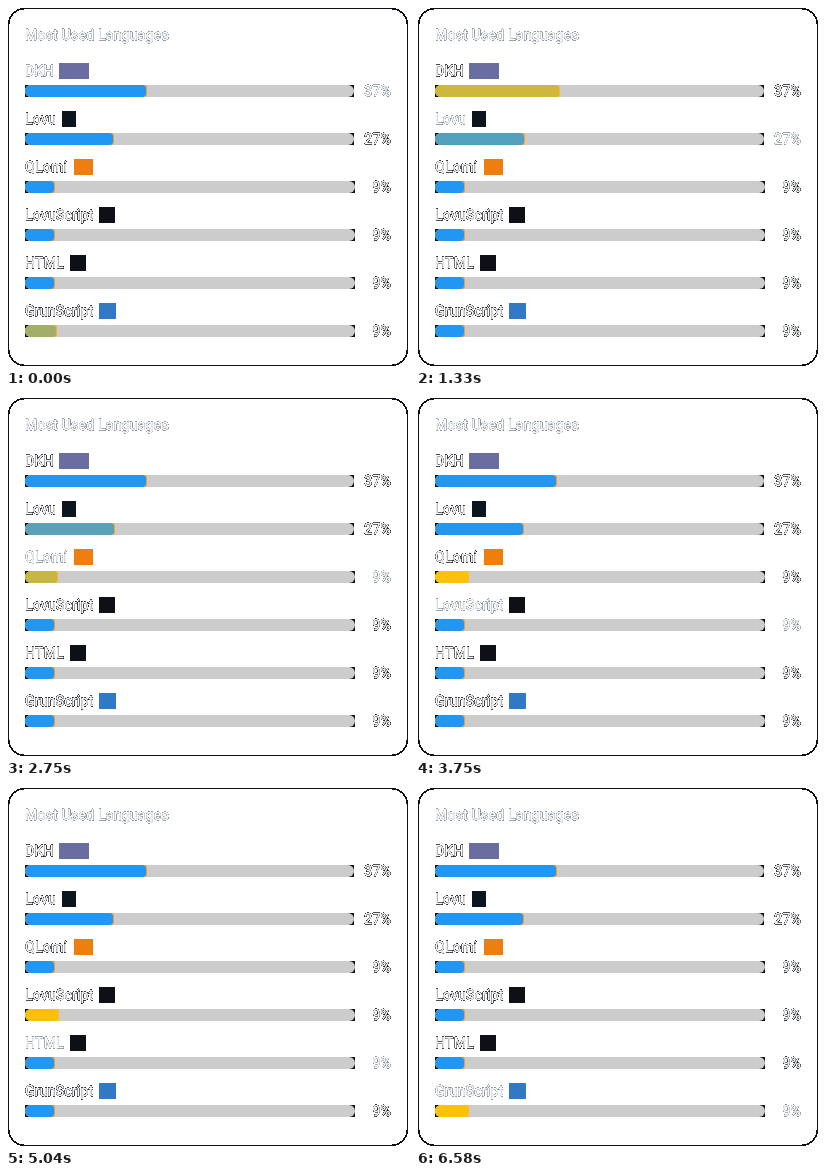
These frames come from a looping animation (404x362 px, 7500 ms). An HTML page with a canvas:

```html
<!DOCTYPE html>
<html lang="en">
<head>
<meta charset="utf-8">
<title>Most Used Languages</title>
<style>
  html, body { margin: 0; width: 100%; height: 100%; overflow: hidden; background: #fff; }
  canvas { display: block; width: 404px; height: 362px; }
</style>
</head>
<body>
<canvas id="stage" width="404" height="362"></canvas>
<script>
const W = 404, H = 362, LOOP = 7500, FADE = 380, FPS = 24;
const FONT = '14px Roboto, sans-serif', SPACING = '0.25px';
const LEFT = 19, RIGHT = 385, PITCH = 48, BAR_H = 12, GROW = 4;
const DARK = [13, 17, 23], SOFT = [120, 134, 148], WHITE = [255, 255, 255];
const BLUE = [33, 150, 243], AMBER = [255, 193, 7], ORANGE = [255, 152, 30];

const rows = [
  { name: 'DKH', share: 37, icon: [53, 30, '#6a6d9f'] },
  { name: 'Lovu', share: 27, icon: [56, 14, '#0b151d'] },
  { name: 'QLomi', share: 9, icon: [68, 19, '#ee7f0e'] },
  { name: 'LovuScript', share: 9, icon: [93, 16, '#0d1117'] },
  { name: 'HTML', share: 9, icon: [64, 16, '#0d1117'] },
  { name: 'GrunScript', share: 9, icon: [93, 17, '#3178c6'] }
];
const starts = [0, 1210, 2500, 3750, 5010, 6210];
const SEAM = 170; // how far the last row has already faded when the loop restarts

const ctx = document.getElementById('stage').getContext('2d');

const mix = (a, b, p) => a.map((v, i) => Math.round(v + (b[i] - v) * p));
const rgb = c => `rgb(${c.join(',')})`;

// Layer whose soft edge pixels are made opaque by blending ink into a matte.
function etch(matte, ink, draw) {
  const layer = document.createElement('canvas');
  layer.width = W;
  layer.height = H;
  const g = layer.getContext('2d', { willReadFrequently: true });
  g.font = FONT;
  g.letterSpacing = SPACING;
  g.fillStyle = g.strokeStyle = '#fff';
  draw(g);
  const img = g.getImageData(0, 0, W, H), d = img.data;
  for (let i = 0; i < d.length; i += 4) {
    const a = d[i + 3];
    d.set(a < 20 ? [0, 0, 0, 0] : [...mix(matte, ink, a / 255), 255], i);
  }
  g.putImageData(img, 0, 0);
  return layer;
}

// Slightly thickened glyphs.
function write(g, text, x, y) {
  g.lineWidth = 0.45;
  g.lineJoin = 'round';
  g.fillText(text, x, y);
  g.strokeText(text, x, y);
}

let frame, title;
function makeLayers() {
  frame = etch(DARK, DARK, g => {
    g.roundRect(2.5, 2.5, 399, 357, 16);
    g.stroke();
  });
  title = etch(SOFT, WHITE, g => write(g, 'Most Used Languages', LEFT, 34));
  rows.forEach((row, i) => {
    const draw = g => {
      const label = row.share + '%';
      write(g, row.name, LEFT, 70 + i * PITCH);
      write(g, label, RIGHT - g.measureText(label).width, 90 + i * PITCH);
    };
    row.plain = etch(DARK, WHITE, draw);
    row.lit = etch(SOFT, WHITE, draw);
  });
}

// cubic-bezier(.4, 0, .6, 1)
function ease(x) {
  if (x <= 0) return 0;
  if (x >= 1) return 1;
  let lo = 0, hi = 1, u;
  for (let n = 0; n < 20; n++) {
    u = (lo + hi) / 2;
    const bx = 1.2 * u * (1 - u) ** 2 + 1.8 * u * u * (1 - u) + u ** 3;
    if (bx < x) lo = u; else hi = u;
  }
  return u * u * (3 - 2 * u);
}

function glow(i, active, t) {
  const p = ease((t - starts[active]) / FADE);
  if (i === active) return p;
  if (active === 0) return i === rows.length - 1 ? 1 - ease((t + SEAM) / FADE) : 0;
  return i === active - 1 ? 1 - p : 0;
}

function fillRound(x, y, w, h, r, color) {
  ctx.beginPath();
  ctx.roundRect(x, y, w, h, r);
  ctx.fillStyle = color;
  ctx.fill();
}

function drawBar(row, y, p) {
  const width = row.share > 9 ? 329 : 330;
  const fill = Math.round(width * row.share / 100 + GROW * p);
  ctx.fillStyle = rgb(DARK);
  ctx.fillRect(LEFT, y, width, BAR_H);
  ctx.save();
  fillRound(LEFT, y, width, BAR_H, 6, '#ccc');
  ctx.clip();
  fillRound(LEFT, y, fill, BAR_H, [0, 3, 3, 0], rgb(mix(ORANGE, AMBER, p)));
  fillRound(LEFT, y, fill - 1, BAR_H, [0, 4, 4, 0], rgb(mix(BLUE, AMBER, p)));
  ctx.restore();
}

function render(now) {
  const t = Math.floor((now % LOOP) * FPS / 1000 + 0.1) * 1000 / FPS % LOOP;
  const active = starts.filter(s => s <= t).length - 1;

  ctx.fillStyle = '#fff';
  ctx.fillRect(0, 0, W, H);
  ctx.drawImage(frame, 0, 0);
  ctx.drawImage(title, 0, 0);

  rows.forEach((row, i) => {
    const [x, w, color] = row.icon;
    ctx.drawImage(i === active ? row.lit : row.plain, 0, 0);
    ctx.fillStyle = color;
    ctx.fillRect(x, 57 + i * PITCH, w, 16);
    drawBar(row, 79 + i * PITCH, glow(i, active, t));
  });
}

function tick() {
  render(performance.now());
  requestAnimationFrame(tick);
}

makeLayers();
tick();
</script>
</body>
</html>
```
